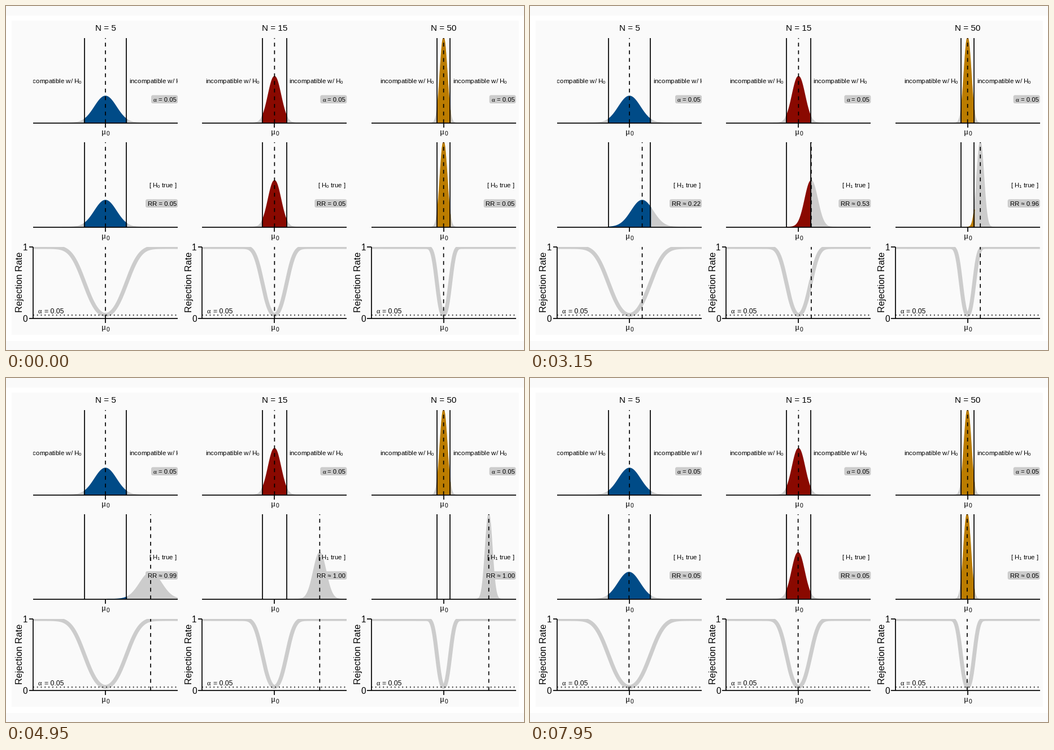
A matplotlib script for the animation above (8 s loop, 917 by 611 pixels).

```python
import math

import numpy as np
import matplotlib.pyplot as plt
from matplotlib.animation import FuncAnimation
from matplotlib.patches import FancyBboxPatch, Rectangle

W, H, DPI = 917, 611, 100
STEP_MS, FRAMES = 50, 160
HOLD, PERIOD = 21, 130          # frames at rest, frames per sweep
UNIT = 128 / 3                  # pixels per standard deviation
HALF = 128
CRIT = 1.96
GREY, BG = "#cccccc", "#fafafa"
SANS, SERIF = "Liberation Sans", "Liberation Serif"
COLUMNS = [(5, "#004b87", 176.05), (15, "#8a0900", 475.35), (50, "#bb7c00", 774.65)]

plt.rcParams["font.family"] = SANS
plt.rcParams["mathtext.default"] = "regular"


def pt(px):
    return px * 72 / DPI


def phi(z):
    return 0.5 * (1 + math.erf(z / math.sqrt(2)))


def power(shift, n):
    z = shift * math.sqrt(n)
    return phi(z - CRIT) + phi(-z - CRIT)


# The speed builds up slowly, then stays constant until the edge.
speed = np.interp(np.arange(PERIOD - HOLD + 1), [0, 30, 42], [0, 0.0127, 0.0374])
travel = np.concatenate([[0], np.cumsum((speed[1:] + speed[:-1]) / 2)])


def shift_at(frame):
    sweep, k = divmod(frame, PERIOD)
    sign = -1 if sweep % 2 else 1
    return sign * travel[max(0, k - HOLD + 1)]


fig = plt.figure(figsize=(W / DPI, H / DPI), dpi=DPI, facecolor=BG)
ax = fig.add_axes([0, 0, 1, 1])
ax.set_xlim(0, W)
ax.set_ylim(H, 0)
ax.axis("off")


def line(x, y, width=1.7, color="black", style="-", z=4, clip=None):
    art, = ax.plot(x, y, lw=pt(width), color=color, ls=style, zorder=z,
                   solid_capstyle="butt", dash_capstyle="butt")
    if clip is not None:
        art.set_clip_path(clip)
    return art


def dashed(x, base, top, clip):
    art = line([x, x], [base, top], style=(0, (4, 4)), z=5, clip=clip)
    art.set_snap(False)
    return art


def label(x, y, s, size=11.5, ha="left", family=SANS, z=8, clip=None, **kw):
    art = ax.text(x, y, s, fontsize=pt(size), ha=ha, va="baseline",
                  family=family, zorder=z, **kw)
    if clip is not None:
        art.set_clip_on(True)
        art.set_clip_path(clip)
    return art


def window(cx, top, base):
    rect = Rectangle((cx - HALF, top), 2 * HALF, base - top, fc="none", ec="none")
    return ax.add_patch(rect)


def badge(x0, x1, y0, y1):
    r = 3
    ax.add_patch(FancyBboxPatch((x0 + r, y0 + r), x1 - x0 - 2 * r, y1 - y0 - 2 * r,
                                boxstyle=f"round,pad={r},rounding_size={r}",
                                fc=GREY, ec="none", zorder=7))


def mu_axis(cx, base):
    line([cx - HALF, cx + HALF], [base, base], z=6)
    line([cx, cx], [base, base + 7.5], z=6)
    label(cx - 7, base + 20, "\u03bc", 15, family=SERIF)
    label(cx + 1.8, base + 22.5, "0", 10.2)


def alpha(x, right, y, size):
    label(x, y, "\u03b1", size, family=SERIF)
    label(right, y, "= 0.05", size, ha="right")


class Bell:
    """Sampling distribution with its retained middle part coloured."""

    def __init__(self, n, color, cx, base):
        self.cx, self.base = cx, base
        self.se = UNIT / math.sqrt(n)
        self.crit = CRIT * self.se
        self.peak = 47.8 * math.sqrt(n / 5)
        self.clip = window(cx, base - 151, base)
        self.full = self.shape(GREY, 2)
        self.mid = self.shape(color, 3)
        for side in (-1, 1):
            x = cx + side * self.crit
            line([x, x], [base, base - 151])
        self.mean = dashed(cx, base, base - 151, self.clip)
        mu_axis(cx, base)
        self.move(0)

    def shape(self, color, z):
        art, = ax.fill([0, 0], [0, 0], fc=color, ec=color, lw=pt(1.7),
                       joinstyle="round", zorder=z)
        art.set_clip_path(self.clip)
        return art

    def area(self, lo, hi, centre):
        x = np.linspace(lo, hi, 161)
        y = self.base - self.peak * np.exp(-((x - centre) / self.se) ** 2 / 2)
        return np.column_stack([np.r_[lo, x, hi], np.r_[self.base, y, self.base]])

    def move(self, shift):
        c = self.cx + shift * UNIT
        reach = 4 * self.se
        self.full.set_xy(self.area(c - reach, c + reach, c))
        lo = max(self.cx - self.crit, c - reach)
        hi = min(self.cx + self.crit, c + reach)
        self.mid.set_visible(hi > lo)
        if hi > lo:
            self.mid.set_xy(self.area(lo, hi, c))
        self.mean.set_xdata([c, c])


class Column:
    def __init__(self, n, color, cx):
        self.n, self.cx = n, cx
        right = cx + HALF
        label(cx, 43.5, f"N = {n}", 15.3, ha="center")

        top = Bell(n, color, cx, 208)
        text = "incompatible w/ H$_0$"
        label(cx - top.crit - 4, 137.3, text, ha="right", clip=top.clip)
        label(cx + top.crit + 4.5, 137.3, text, clip=top.clip)
        badge(right - 47, right, 158.3, 173)
        alpha(right - 43, right - 2, 170.3, 11.2)

        self.bell = Bell(n, color, cx, 393)
        self.truth = label(right - 1.7, 321.5, "", 11.4, ha="right")
        badge(right - 57, right, 343.3, 358)
        self.rate = label(right - 2, 355.3, "", 11.4, ha="right")

        self.draw_power(555, 428)

    def draw_power(self, base, top):
        cx, left = self.cx, self.cx - HALF
        clip = window(cx, top - 0.5, base)
        xs = np.linspace(-3, 3, 301)
        ys = [base - (base - top) * power(x, self.n) for x in xs]
        line(cx + xs * UNIT, ys, 7, GREY, z=2, clip=clip)
        y05 = base - 0.05 * (base - top)
        line([left, cx + HALF], [y05, y05], style=(0, (1, 3)), z=4)
        self.marker = dashed(cx, base, top - 0.5, clip)
        line([left, left], [base, top], z=6)
        for y, s in ((top, "1"), (base, "0")):
            line([left - 7.5, left], [y, y], z=6)
            label(left - 14, y + 5.7, s, 15.5, ha="center")
        label(left - 18.8, (base + top) / 2 - 1, "Rejection Rate", 16.2,
              ha="center", rotation=90, rotation_mode="anchor")
        alpha(left + 8.5, left + 54, 546.3, 12.3)
        mu_axis(cx, base)

    def update(self, shift):
        self.bell.move(shift)
        x = self.cx + shift * UNIT
        self.marker.set_xdata([x, x])
        moved = shift != 0
        self.truth.set_text(f"[ H$_{int(moved)}$ true ]")
        sign = "\u2248" if moved else "="
        self.rate.set_text(f"RR {sign} {power(shift, self.n):.2f}")


ax.add_patch(Rectangle((0, 16.5), W, 578.5, fc="white", ec="none", zorder=0))
ax.add_patch(Rectangle((10, 26), 898, 558, fc=BG, ec="none", zorder=1))
columns = [Column(*spec) for spec in COLUMNS]


def draw(frame):
    shift = shift_at(frame)
    for col in columns:
        col.update(shift)
    return []


anim = FuncAnimation(fig, draw, frames=FRAMES, init_func=lambda: draw(0),
                     interval=STEP_MS, repeat=True, repeat_delay=0, blit=False)
plt.show()
```
